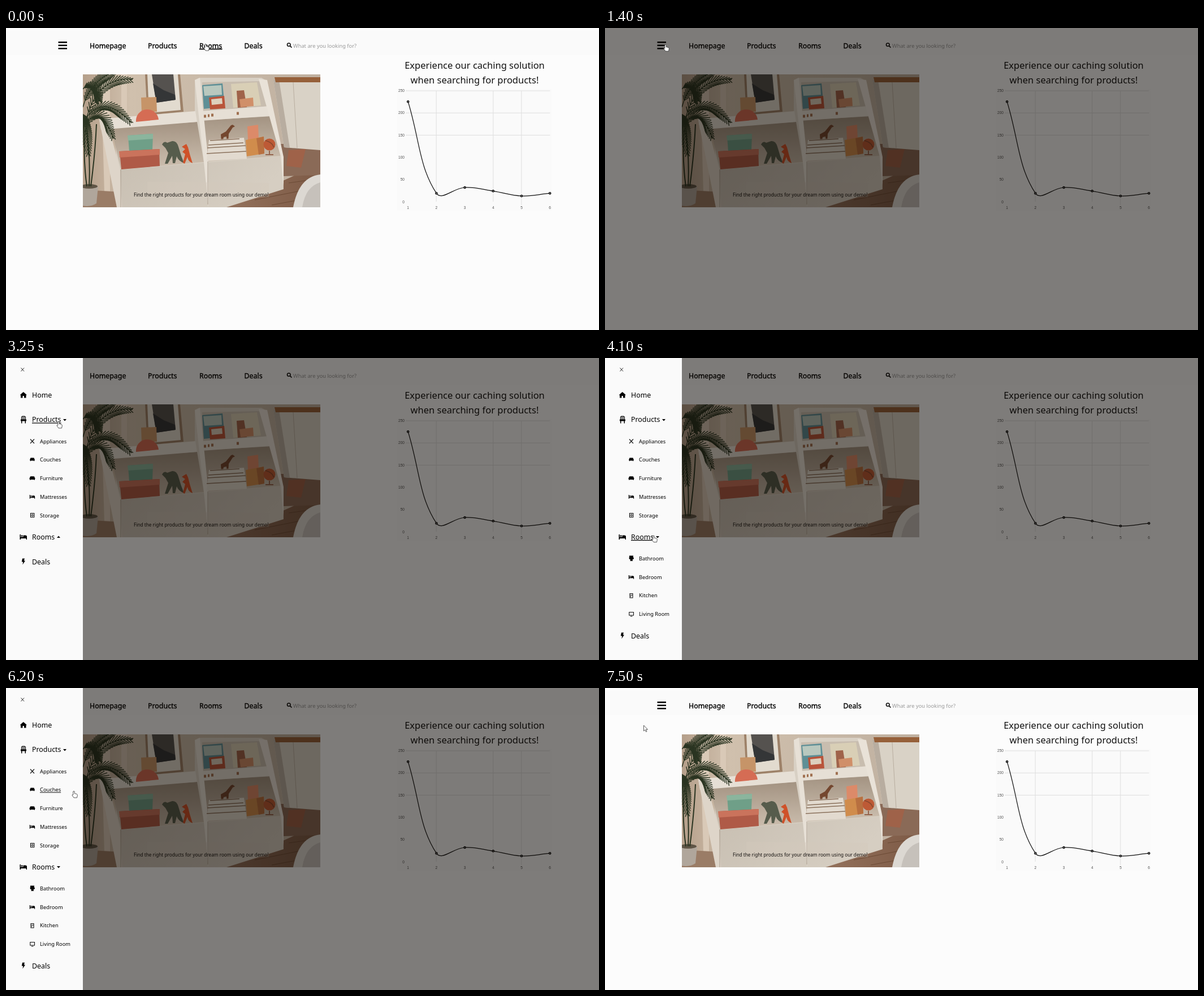
An HTML page that plays this animation: 1049 by 534 pixels, repeating every 7.55 s.

```html
<!DOCTYPE html>
<html lang="en">
<head>
<meta charset="utf-8">
<title>Furniture shop demo</title>
<style>
html, body { margin: 0; width: 100%; height: 100%; overflow: hidden; background: #fcfcfc }
svg { display: block; font-family: "Noto Sans", sans-serif }
text { white-space: pre }
.on { text-decoration: underline }
.nav { font-size: 12.4px; stroke: #000; stroke-width: .35px }
.main { font-size: 12.4px }
.sub { font-size: 9.3px }
.axis { font: 6.6px "Liberation Sans", Arial, sans-serif; fill: #555 }
</style>
</head>
<body>
<svg id="stage" width="1049" height="534" viewBox="0 0 1049 534">
  <defs>
    <clipPath id="crop"><path d="M136 82H556V317H136Z"/></clipPath>
    <linearGradient id="wall"><stop stop-color="#b59f8a"/><stop offset=".2" stop-color="#d0c0ad"/><stop offset="1" stop-color="#bfb0a0"/></linearGradient>
    <linearGradient id="front" x2="1" y2=".3"><stop stop-color="#c8bfb2"/><stop offset="1" stop-color="#d6cec2"/></linearGradient>
    <linearGradient id="niche" x2="0" y2="1"><stop stop-color="#a39382"/><stop offset="1" stop-color="#cdc0b0"/></linearGradient>
    <linearGradient id="wood" x2="1"><stop stop-color="#94725c"/><stop offset="1" stop-color="#7d5a46"/></linearGradient>
    <path id="bed" d="M0 0H1.600V4.500H6V1.500H10Q12.500 1.500 12.500 4V9H11V7H1.600V9H0ZM2.300 2.600A1.400 1.400 0 1 1 5.100 2.600A1.400 1.400 0 1 1 2.300 2.600"/>
    <path id="sofa" d="M1 2Q1 0 3 0H9Q11 0 11 2V3Q12.500 3.500 12 5L11 8H9.500V7H2.500V8H1L0 5Q-.5 3.500 1 3Z"/>
    <path id="bolt" d="M2 0H6L4.800 4H7L2.300 11L3.300 6H.8Z"/>
  </defs>

  <path d="M0 4H1049V48H0Z" fill="#fafafa"/>
  <path d="M92.500 25.200H108M92.500 30.800H108M92.500 36.300H108" stroke="#000" stroke-width="2.500"/>
  <g id="nav"></g>
  <g fill="none" stroke="#111" stroke-width="1.600"><circle cx="500.300" cy="29.500" r="2.800"/><path d="M502.400 31.600L505.500 34.600"/></g>
  <text x="508" y="34.500" font-size="9.300" fill="#999">What are you looking for?</text>

  <g id="photo" clip-path="url(#crop)">
    <path d="M136 82H556V317H136Z" fill="url(#wall)"/>
    <path d="M168 82H184V290H174ZM204 82H214V165H204Z" fill="#d9c9b7"/>
    <path d="M136 286L205 290V317H136Z" fill="#9a7c66"/>
    <path d="M385 317L490 270L556 240V317Z" fill="url(#wood)"/>
    <path d="M440 304L556 281M470 313L556 297M500 274L556 266" stroke="#65452f" stroke-width=".8"/>
    <path d="M486 205H556V260L490 262Z" fill="#8a6a57"/>
    <path d="M500 216L530 214L522 247L496 244Z" fill="#9f6249"/>
    <path d="M473 92H556V216L492 211Z" fill="#d9d2c6"/>
    <path d="M473 92L483 92L502 212L492 211Z" fill="#b8ada0"/>
    <path d="M475 87H556V96L477 96Z" fill="#96603a"/>
    <path d="M508 96L515 212" stroke="#b8ad9f"/>
    <path d="M246 82H308L314 148L250 154Z" fill="#9d8168"/>
    <path d="M250 82H304L309 145L253 150Z" fill="#e2dbcf"/>
    <path d="M258 82H296L300 127L266 132Z" fill="#55524f"/>
    <path d="M260 98L279 110L299 118L300 127L266 132Z" fill="#343637"/>
    <!-- bookcase -->
    <path d="M334 92L342 88L452 88L462 94L490 228V285L358 299L203 317L190 166L334 150Z" fill="#d8d0c4"/>
    <path d="M347 96L448 94L466 138L348 147Z" fill="#c8bdaf"/>
    <path d="M186 176L338 166L350 237L203 250Z" fill="url(#niche)"/>
    <path d="M348 163L471 156L487 226L358 236Z" fill="url(#niche)"/>
    <path d="M165 161L335 147L338 166L168 180Z" fill="#e6dfd5"/>
    <path d="M344 147L470 138L473 155L346 164Z" fill="#e6dfd5"/>
    <path d="M197 251L487 227L491 285L390 317H203Z" fill="url(#front)"/>
    <path d="M165 163L178 162L202 250L205 317H196Z" fill="#ded5c9"/>
    <path d="M334 92L343 88L358 236V317L350 237Z" fill="#e7e0d6"/>
    <path d="M447 90L462 92L491 228V285L486 227Z" fill="#e9e2d8"/>
    <path d="M357 236V312M203 250V317" stroke="#a99c8d"/>
    <!-- shelf contents -->
    <path d="M239 123L266 122L267 148L240 150Z" fill="#c69468"/>
    <path d="M230 166A20 20 0 0 1 270 162Z" fill="#d56c54"/>
    <path d="M347 101L383 98L387 139L350 143Z" fill="#5e8f96"/>
    <path d="M349 103L381 101L382 118L351 120Z" fill="#b9c8be"/>
    <path d="M359 123L386 120L388 142L361 144Z" fill="#b9543a"/>
    <path d="M363 126L382 124L383 134L364 136Z" fill="#ddd0bd"/>
    <path d="M398 99L444 96L451 137L402 141Z" fill="#d9cfb6"/>
    <path d="M408 111L421 110L426 140L410 141Z" fill="#a0634a"/>
    <path d="M413 126L437 123L438 138L415 140Z" fill="#d08f69"/>
    <path d="M350 156h4m3-1h3m3-1h4m41-3h4" stroke="#a07050" stroke-width="5"/>
    <path d="M216 190L260 187L259 216L218 219Z" fill="#6f9f88"/>
    <path d="M215 190L260 187V196L216 199Z" fill="#8bb59d"/>
    <path d="M201 218L271 214L272 244L204 250Z" fill="#af5a47"/>
    <path d="M200 218L272 214V224L201 229Z" fill="#ca735c"/>
    <path d="M276 206Q280 199 285 203L294 200Q302 199 305 210Q309 225 315 239Q305 235 302 227L299 239H295L294 226L286 240H281L287 221L282 212Z" fill="#565c4c"/>
    <path d="M311 210L319 205L322 211Q325 224 330 239Q322 236 321 228L316 240L313 238L317 223L312 219L317 214Z" fill="#cf5129"/>
    <path d="M401 171L405 174L401 176L394 187L393 203H391L390 192L385 193L383 204H381L380 188L389 183L398 172Z" fill="#74472f"/>
    <path d="M359 198L421 194L426 231L355 235Z" fill="#e2dacf"/>
    <path d="M361 199L413 196M358 207L420 203M356 212L424 208M355 222L425 218" stroke="#8a715c" stroke-width="1.400"/>
    <path d="M427 174L446 171L447 197L428 199Z" fill="#dc8a69"/>
    <path d="M424 198L456 192L457 222L426 227Z" fill="#d08c4c"/>
    <path d="M443 195L456 192L457 222L447 224Z" fill="#b87040"/>
    <circle cx="466" cy="206" r="10.500" fill="#bd5a36"/>
    <path d="M459 199Q471 202 474 211M466 217V223M459 224H473" fill="none" stroke="#84482f" stroke-width="1.500"/>
    <path d="M508 317Q518 263 556 259V317Z" fill="#dcd8d2"/>
    <path d="M524 317Q530 280 556 273V317Z" fill="#c6c1bb"/>
    <path d="M134 280Q148 273 163 280L160 310Q150 317 134 314Z" fill="#b0a69b"/>
    <ellipse cx="147" cy="280" rx="15" ry="4" fill="#5f5546"/>
    <g id="plant" fill="none" stroke="#2a3421"></g>
    <path d="M250 272L465 274V299H250Z" fill="#d2c8ba" opacity=".38"/>
    <text x="226" y="298" font-size="8.250" fill="#14110f">Find the right products for your dream room using our demo!</text>
  </g>

  <g font-size="16.500" fill="#111" text-anchor="middle">
    <text x="829" y="72">Experience our caching solution</text>
    <text x="829" y="98">when searching for products!</text>
  </g>
  <path d="M692 108H965V323H692Z" fill="#fafafa"/>
  <path d="M707 111H962.500M707 150.200H962.500M707 189.500H962.500M761.200 111V307M861.800 111V307M911.800 111V313" fill="none" stroke="#dedede"/>
  <g id="chart"></g>

  <path id="shade" d="M0 0H1049V534H0Z" fill="#090500"/>
  <g id="side">
    <path d="M0 0H136V534H0Z" fill="#fafafa"/>
    <path d="M26.500 17.500L32 23.500M32 17.500L26.500 23.500" stroke="#222"/>
    <path d="M24.500 65.500L30.800 60L37 65.500H35.500V70.500H32V67H29.500V70.500H26V65.500Z"/>
    <path d="M27.500 109V105Q27.500 103 29.500 103H32.500Q34.500 103 34.500 105V109M29.800 103V109M32.200 103V109" fill="none" stroke="#000" stroke-width="1.100"/>
    <path d="M26 108.500H36V111.500H35V115.500H33.500V111.500H28.500V115.500H27V111.500H26Z"/>
  </g>
  <g id="cursor" stroke="#333" stroke-width=".8" stroke-linejoin="round" fill="#fff">
    <path id="hand" d="M-1.200 1Q0-.6 1.200 1V4.500L5 5.400Q6.600 6 6.300 8L5.500 12H0L-3 7.700Q-3.300 6-1.200 7Z"/>
    <path id="arrow" d="M0 0V10L2.300 8L4 11.500L5.500 10.800L4 7.300H7Z"/>
  </g>
</svg>
<script>
const $ = id => document.getElementById(id);
const LOOP = 7550, OPEN = 1400, PRODUCTS = 2700, ROOMS = 4050, CLOSE = 7200;
const links = [];

function add(parent, tag, attrs, text) {
  const el = document.createElementNS('http://www.w3.org/2000/svg', tag);
  for (const k in attrs) el.setAttribute(k, attrs[k]);
  if (text) el.textContent = text;
  return parent.appendChild(el);
}
const group = parent => add(parent, 'g', {});
const shift = (el, x, y) => el.setAttribute('transform', `translate(${x} ${y})`);
const show = (el, on) => el.style.display = on ? '' : 'none';

// A link remembers its hit box and the group that moves it.
function link(parent, kind, label, x, y, box) {
  const el = add(parent, 'text', {x, y: y + (kind == 'sub' ? 3.5 : 4.8), class: kind}, label);
  links.push({el, kind, parent, y, x0: box[0], x1: box[1], half: kind == 'sub' ? 9 : 10});
}

[['Homepage', 148, 212], ['Products', 251, 303], ['Rooms', 342, 383], ['Deals', 421.5, 454]]
  .forEach(([s, a, b]) => link($('nav'), 'nav', s, a, 31, [a, b]));

// Sidebar
const side = $('side');
const subProducts = group(side), rooms = group(side), subRooms = group(side), deals = group(side);
link(side, 'main', 'Home', 46, 65, [24, 110]);
link(side, 'main', 'Products', 46, 108.6, [24, 110]);
link(rooms, 'main', 'Rooms', 46, 316, [24, 110]);
link(deals, 'main', 'Deals', 46, 360, [24, 110]);
['Appliances', 'Couches', 'Furniture', 'Mattresses', 'Storage']
  .forEach((s, i) => link(subProducts, 'sub', s, 60, 147 + i * 32.8, [42, 130]));
['Bathroom', 'Bedroom', 'Kitchen', 'Living Room']
  .forEach((s, i) => link(subRooms, 'sub', s, 60, 354.3 + i * 32.8, [42, 130]));

const icon = (parent, ref, x, y, scale = 1) =>
  add(parent, 'use', {href: '#' + ref, transform: `translate(${x} ${y}) scale(${scale})`});
const line = (parent, d) => add(parent, 'path', {d, fill: 'none', stroke: '#111', 'stroke-width': 1.1});
icon(rooms, 'bed', 24.5, 312);
icon(deals, 'bolt', 27, 354.5);
line(subProducts, 'M43 143.500L50 151M50 143.500L43 151');
icon(subProducts, 'sofa', 42.2, 176.5, .72);
icon(subProducts, 'sofa', 41.5, 209.2, .83);
icon(subProducts, 'bed', 41.8, 242, .75);
line(subProducts, 'M43.500 274.500H49.800V281.500H43.500ZM43.500 278H49.800M45.500 276.300H48M45.500 279.800H48');
add(subRooms, 'path', {d: 'M43 349.500H50V353H51Q51 356 48.500 356.500L49 359H44.500L45 356.500Q42.500 356 42.500 353H43Z'});
icon(subRooms, 'bed', 41.8, 384, .75);
line(subRooms, 'M44 416.500H49V424H44ZM44 419.300H49M45.500 421V422.500');
line(subRooms, 'M42.800 449.500H50.500V455H42.800ZM44.800 456.800H48.500');
const caretA = add(side, 'path', {}), caretB = add(rooms, 'path', {});
const caret = (el, x, y, down) => el.setAttribute('d', down ? `M${x} ${y - 1}h6l-3 3.500z` : `M${x} ${y + 2}h6l-3 -3.500z`);

// Chart
const chart = $('chart');
const px = i => 711.2 + i * 50.2;
const pts = [130.3, 292.2, 282, 288.3, 297, 292.2].map((y, i) => [px(i), y]);
for (let i = 0; i < 6; i++) {
  add(chart, 'text', {x: 705, y: 113 + i * 39.3, class: 'axis', 'text-anchor': 'end'}, String(250 - i * 50));
  add(chart, 'text', {x: px(i), y: 319.5, class: 'axis', 'text-anchor': 'middle'}, String(i + 1));
}
const dist = (a, b) => Math.hypot(a[0] - b[0], a[1] - b[1]);
function handles(i) {
  const p = pts[i], a = pts[i - 1] || p, b = pts[i + 1] || p;
  const da = dist(a, p), db = dist(p, b), k = .4 / (da + db);
  return [-da, db].map(d => p.map((v, j) => v + d * k * (b[j] - a[j])));
}
let curve = 'M' + pts[0];
for (let i = 1; i < 6; i++) curve += `C${handles(i - 1)[1]} ${handles(i)[0]} ${pts[i]}`;
add(chart, 'path', {d: curve, fill: 'none', stroke: '#111', 'stroke-width': 1.2});
pts.forEach(([cx, cy]) => add(chart, 'circle', {cx, cy, r: 1.7, fill: '#888', stroke: '#000', 'stroke-width': 1.2}));

// Palm: each frond is a quadratic arc with leaflets on both sides.
function frond(x0, y0, cx, cy, x1, y1) {
  let d = `M${x0} ${y0}Q${cx} ${cy} ${x1} ${y1}`;
  for (let i = 3; i < 22; i++) {
    const t = i / 22, u = 1 - t;
    const x = u * u * x0 + 2 * u * t * cx + t * t * x1, y = u * u * y0 + 2 * u * t * cy + t * t * y1;
    const a = Math.atan2(u * (cy - y0) + t * (y1 - cy), u * (cx - x0) + t * (x1 - cx));
    const len = 6 + 14 * Math.sin(Math.PI * t);
    for (const s of [-.5, .5])
      d += `M${x} ${y}l${len * Math.cos(a + s)} ${len * Math.sin(a + s) + 2}`;
  }
  add($('plant'), 'path', {d, 'stroke-width': 1.4});
}
add($('plant'), 'path', {d: 'M147 280Q150 230 141 160M143 280Q136 230 140 180M150 280Q158 220 160 170', 'stroke-width': 2});
frond(140, 170, 158, 85, 224, 91);
frond(138, 165, 170, 112, 222, 168);
frond(136, 140, 148, 95, 190, 78);
frond(134, 180, 165, 125, 190, 196);
frond(132, 150, 140, 150, 146, 225);
frond(134, 110, 150, 90, 165, 130);

// Pointer path: time, x, y
const path = [
  [0, 353, 28], [100, 350, 28], [650, 169, 30], [850, 121, 30], [1050, 107, 29], [1750, 107, 29],
  [2350, 93, 106], [3250, 93, 112], [3720, 86, 312], [4250, 86, 314], [4650, 84, 420],
  [5050, 83, 342], [5450, 84, 142], [5800, 96, 146], [6200, 120, 182], [6350, 119, 180],
  [6950, 74, 66], [7150, 30, 19], [7250, 30, 19], [7500, 68.5, 66], [LOOP, 68.5, 66]
];
const ease = v => v * v * (3 - 2 * v);
const ramp = (t, a, b) => Math.min(1, Math.max(0, (t - a) / (b - a)));
function pointer(t) {
  const i = path.findIndex(p => p[0] > t), a = path[i - 1], b = path[i];
  const k = ease(ramp(t, a[0], b[0]));
  return [a[1] + (b[1] - a[1]) * k, a[2] + (b[2] - a[2]) * k];
}

function draw(now) {
  const t = now % LOOP, [x, y] = pointer(t);
  const listA = t >= PRODUCTS, listB = t >= ROOMS;
  const slide = ease(ramp(t, OPEN, 1750)) - ease(ramp(t, CLOSE, 7450));
  const dy = new Map([[rooms, listA ? 0 : -163.5], [deals, (listA ? 0 : -163.5) + (listB ? 131 : 0)]]);

  $('shade').setAttribute('opacity', .515 * (ramp(t, 1200, OPEN) - ramp(t, CLOSE, 7450)));
  shift(side, -137 * (1 - slide), 0);
  show(subProducts, listA);
  show(subRooms, listB);
  dy.forEach((v, el) => shift(el, 0, v));
  caret(caretA, 101, 109, listA);
  caret(caretB, 90, 316, listB);

  const opened = slide > .9;
  let over = opened && x < 136 || t < 2000 && x < 110;
  for (const l of links) {
    const live = l.kind == 'nav' ? t < 1200 : opened && l.parent.style.display != 'none';
    const hit = live && x >= l.x0 && x <= l.x1 && Math.abs(y - l.y - (dy.get(l.parent) || 0)) <= l.half;
    l.el.classList.toggle('on', hit);
    over = over || hit;
  }
  if (t > CLOSE + 100) over = false;
  shift($('cursor'), x, y);
  show($('hand'), over);
  show($('arrow'), !over);
}

const start = performance.now();
function tick() {
  draw(performance.now() - start);
  requestAnimationFrame(tick);
}
tick();
</script>
</body>
</html>
```
